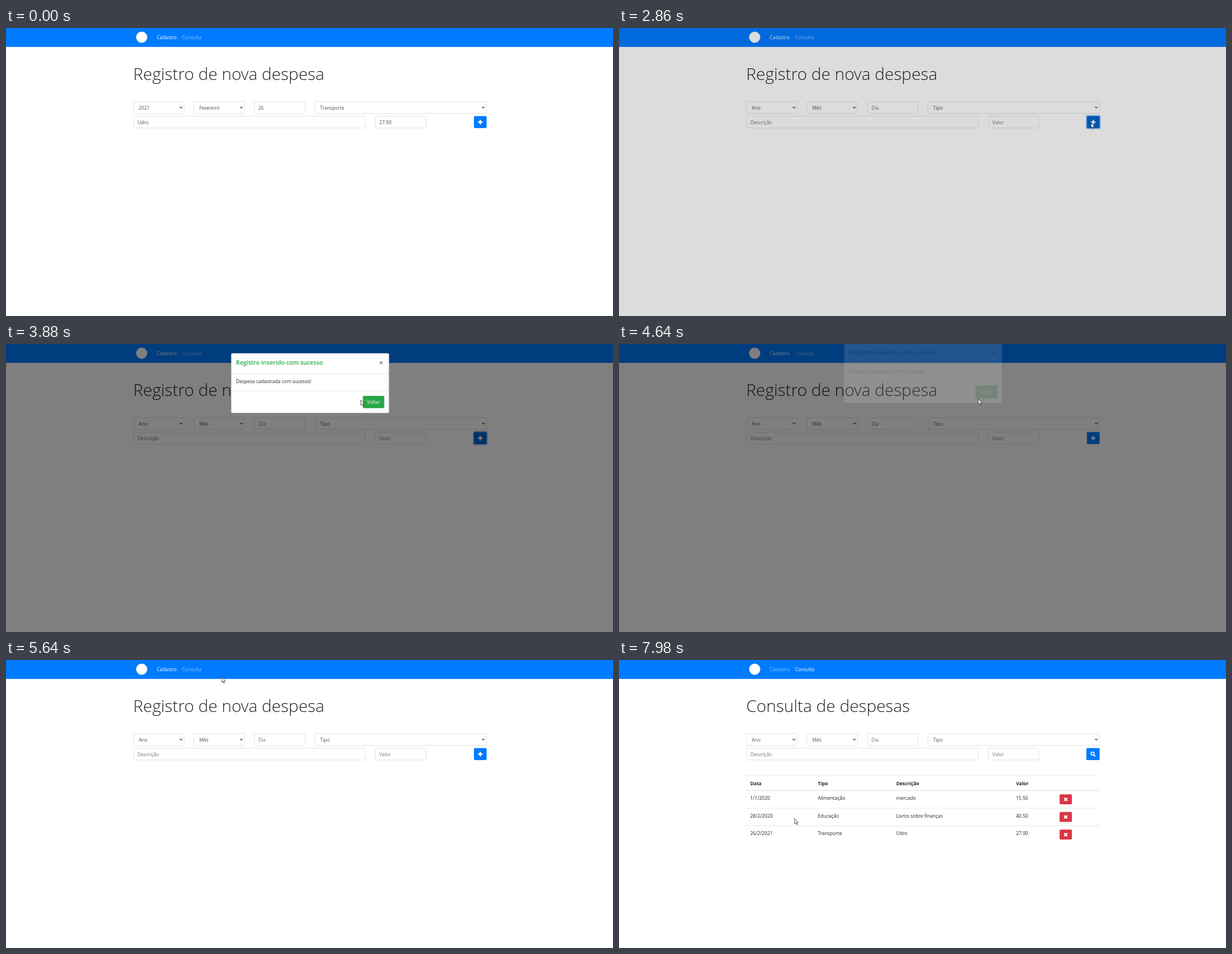
An HTML page with a canvas that plays this animation: 1087 px wide and 515 px high, repeating every 8000 ms.

```html
<!DOCTYPE html>
<html lang="pt-BR">
<head>
<meta charset="utf-8">
<title>Registro de despesas</title>
<style>
  html, body { margin: 0; width: 100%; height: 100%; overflow: hidden; background: #fff; }
  canvas { display: block; }
</style>
</head>
<body>
<canvas id="stage" width="1087" height="515"></canvas>
<script>
const W = 1087, H = 515, LOOP = 8000;
const FAMILY = '"Open Sans", "Noto Sans", sans-serif';
const BLUE = '#007bff', INK = '#212529', FIELD = '#495057', HINT = '#6c757d';
const RIDE = 'Udro';

// Twelve-column form grid
const LEFT = 228, COLUMN = 54.15, GUTTER = 17.1, FIELD_H = 21.7;
const ROW1 = 131.2, ROW2 = 157.4;
const columnX = n => LEFT + n * COLUMN;
const spanW = n => n * COLUMN - GUTTER;
const RIGHT = LEFT + spanW(12);

const stage = document.getElementById('stage').getContext('2d');
const modalLayer = document.createElement('canvas');
modalLayer.width = 300;
modalLayer.height = 130;
const modal = modalLayer.getContext('2d');

const clamp = v => Math.max(0, Math.min(1, v));
const ramp = (t, start, length) => clamp((t - start) / length);
const smooth = p => p * p * (3 - 2 * p);
const easeOut = p => 1 - Math.pow(1 - p, 1.75);
const mix = (a, b, p) => a + (b - a) * p;
const blend = (a, b, p) => `rgb(${a.map((v, i) => Math.round(mix(v, b[i], p)))})`;

function text(c, str, x, y, color, size = 8.5, weight = 400, align = 'left') {
  c.font = `${weight} ${size}px ${FAMILY}`;
  c.textAlign = align;
  c.fillStyle = color;
  c.fillText(str, x, y);
}

function box(c, x, y, w, h, r, fill, line, lineWidth = 0.7) {
  c.beginPath();
  c.roundRect(x, y, w, h, r);
  if (fill) { c.fillStyle = fill; c.fill(); }
  if (line) { c.strokeStyle = line; c.lineWidth = lineWidth; c.stroke(); }
}

function strokes(c, color, width, lines, cap = 'butt') {
  c.strokeStyle = color;
  c.lineWidth = width;
  c.lineCap = cap;
  c.lineJoin = 'miter';
  c.beginPath();
  for (const [x, y, ...rest] of lines) {
    c.moveTo(x, y);
    for (let i = 0; i < rest.length; i += 2) c.lineTo(rest[i], rest[i + 1]);
  }
  c.stroke();
}

function frame(column, span, y) {
  const x = columnX(column), w = spanW(span);
  box(stage, x + 0.35, y + 0.35, w - 0.7, FIELD_H - 0.7, 2, '#fff', '#ced4da');
  return [x, x + w];
}

function field(column, span, y, label, color) {
  const [x] = frame(column, span, y);
  text(stage, label, x + 7.4, y + 14.5, color);
}

function select(column, span, y, label) {
  const [x, end] = frame(column, span, y);
  text(stage, label, x + 9.7, y + 14.9, FIELD);
  const tip = end - 5.9;
  strokes(stage, '#343a40', 1.25, [[tip - 2.4, y + 9.7, tip, y + 12, tip + 2.4, y + 9.7]]);
}

// Pointer path: [start, end, x, y, easing, control x, control y]
const START = [1011, 464];
const PATH = [
  [320, 740, 511, 290, easeOut],
  [1140, 1940, 828, 182, smooth],
  [1950, 2180, 839, 171, smooth],
  [2330, 2780, 845, 169, smooth],
  [3060, 3560, 634, 100, smooth],
  [3840, 4030, 643, 98, smooth],
  [4960, 5740, 374, 27, smooth],
  [5745, 5900, 347, 15, smooth],
  [6020, 6110, 350, 15, smooth],
  [6480, 6660, 350, 21, smooth],
  [7070, 7880, 309, 258, smooth, 270, 150],
  [7890, 7980, 314, 283, smooth]
];

function pointerAt(t) {
  let [x, y] = START;
  for (const [from, to, nx, ny, ease, cx = (x + nx) / 2, cy = (y + ny) / 2] of PATH) {
    if (t < from) break;
    const p = ease(ramp(t, from, to - from)), q = 1 - p;
    x = q * q * x + 2 * p * q * cx + p * p * nx;
    y = q * q * y + 2 * p * q * cy + p * p * ny;
  }
  return [x, y];
}

const within = ([x, y], l, t, r, b) => x >= l && x <= r && y >= t && y <= b;

function pointerKind(pos, t) {
  const covered = t > 2850 && t < 4815;
  if (covered) return t < 4510 && within(pos, 639, 93, 677, 114) ? 'hand' : 'arrow';
  if (within(pos, 311, 4, 355, 30) || within(pos, 838, 157, 861, 179)) return 'hand';
  const overTitle = within(pos, 228, 62, t < 6480 ? 570 : 516, 101);
  return overTitle || within(pos, 228, 157, 644, 179) ? 'beam' : 'arrow';
}

const ARROW = new Path2D('M.4 .4V9.6L2.4 7.8 3.9 11.4 5.4 10.8 3.9 7.3H6.8Z');
const HAND = new Path2D('M-1 7.6V1.1Q-1 .4 0 .4T1 1.1V5Q2.2 4.3 2.8 5.3 4 4.8 4.4 5.9 5.5 5.7 5.5 7V9.8Q5.5 11.4 4.4 12.6V14.4H-1V13L-3.8 9.3Q-4.3 8.2-3.4 7.7-2.4 7.3-1 9Z');

function drawPointer(t) {
  if (t < 320) return;
  const pos = pointerAt(t), kind = pointerKind(pos, t);
  stage.save();
  stage.translate(...pos);
  if (kind === 'beam') {
    strokes(stage, '#333', 0.8, [[0, -5, 0, 5], [-2, -5.3, 2, -5.3], [-2, 5.3, 2, 5.3]]);
  } else {
    const shape = kind === 'hand' ? HAND : ARROW;
    stage.fillStyle = '#fff';
    stage.fill(shape);
    stage.strokeStyle = '#111';
    stage.lineWidth = 0.7;
    stage.lineJoin = 'round';
    stage.stroke(shape);
  }
  stage.restore();
}

function drawNav(t, listing) {
  stage.fillStyle = BLUE;
  stage.fillRect(0, 0, W, 33.8);
  stage.fillStyle = '#fff';
  stage.beginPath();
  stage.arc(243, 16.5, 10, 0, 7);
  stage.fill();
  const faded = 'rgba(255,255,255,.55)';
  const hover = t > 5810 ? 'rgba(255,255,255,.75)' : faded;
  text(stage, 'Cadastro', 270, 20, listing ? faded : '#fff');
  text(stage, 'Consulta', 315, 20, listing ? '#fff' : hover);
}

function drawForm(filled) {
  const tone = filled ? FIELD : HINT;
  select(0, 2, ROW1, filled ? '2021' : 'Ano');
  select(2, 2, ROW1, filled ? 'Fevereiro' : 'Mês');
  field(4, 2, ROW1, filled ? '26' : 'Dia', tone);
  select(6, 6, ROW1, filled ? 'Transporte' : 'Tipo');
  field(0, 8, ROW2, filled ? RIDE : 'Descrição', tone);
  field(8, 2, ROW2, filled ? '27.90' : 'Valor', tone);
}

function drawAddButton(t) {
  const w = 22.8, x = RIGHT - w;
  const focused = t >= 2850 && t < 4510;
  if (focused) box(stage, x - 1.8, ROW2 - 1.8, w + 3.6, FIELD_H + 3.6, 3.5, 'rgba(38,143,255,.5)');
  const hover = t < 2850 ? ramp(t, 2070, 150) : 0;
  const fill = focused ? '#0062cc' : blend([0, 123, 255], [0, 105, 217], hover);
  box(stage, x, ROW2, w, FIELD_H, 2, fill);
  strokes(stage, '#fff', 2.4, [[845.3, 168.3, 853.3, 168.3], [849.3, 164.3, 849.3, 172.3]]);
}

function drawSearchButton() {
  const w = 23.8;
  box(stage, RIGHT - w, ROW2, w, FIELD_H, 2, BLUE);
  stage.strokeStyle = '#fff';
  stage.lineWidth = 1.6;
  stage.beginPath();
  stage.arc(848, 167.4, 2.8, 0, 7);
  stage.stroke();
  strokes(stage, '#fff', 2, [[850.2, 169.6, 852.3, 171.7]], 'round');
}

function drawTable() {
  const columns = [235, 356, 496.5, 711];
  const rows = [
    ['1/1/2020', 'Alimentação', 'mercado', '15.50'],
    ['28/2/2020', 'Educação', 'Livros sobre finanças', '40.50'],
    ['26/2/2021', 'Transporte', RIDE, '27.90']
  ];
  const rule = (y, h) => { stage.fillStyle = '#dee2e6'; stage.fillRect(LEFT, y, RIGHT - LEFT, h); };
  rule(206.5, 0.8);
  rule(232.8, 1.2);
  ['Data', 'Tipo', 'Descrição', 'Valor'].forEach((s, i) => text(stage, s, columns[i], 223.5, INK, 8.5, 700));
  rows.forEach((row, n) => {
    const y = 250.3 + n * 31.5;
    if (n) rule(y - 17.3, 0.8);
    row.forEach((s, i) => text(stage, s, columns[i], y, INK));
    box(stage, 789, y - 10, 22, 17.6, 2, '#dc3545');
    const cy = y - 1;
    strokes(stage, '#fff', 2.4, [[797.4, cy - 2.6, 802.6, cy + 2.6], [802.6, cy - 2.6, 797.4, cy + 2.6]]);
  });
}

function drawModal(t) {
  const opacity = t < 4510 ? ramp(t, 2932, 150) : 1 - ramp(t, 4510, 150);
  if (opacity <= 0) return;
  const shift = t < 4510
    ? -28.5 * (1 - easeOut(ramp(t, 2932, 300)))
    : -28.5 * easeOut(ramp(t, 4510, 300));

  modal.clearRect(0, 0, 300, 130);
  box(modal, 0.5, 0.5, 283, 107, 2.5, '#fff', 'rgba(0,0,0,.2)');
  modal.fillStyle = '#dee2e6';
  modal.fillRect(1, 37, 282, 0.8);
  modal.fillRect(1, 67.5, 282, 0.8);
  text(modal, 'Registro inserido com sucesso', 9.3, 21, '#28a745', 10.75, 600);
  text(modal, '×', 269.5, 21.5, 'rgba(0,0,0,.5)', 13, 700, 'center');
  text(modal, 'Despesa cadastrada com sucesso!', 9.3, 54.3, INK);
  const pressed = t >= 4430;
  if (pressed) box(modal, 234.7, 74.9, 42, 25.6, 3.5, 'rgba(72,180,97,.5)');
  const hover = pressed ? 0 : ramp(t, 3900, 150);
  box(modal, 236.5, 76.7, 38.4, 22, 2, blend([40, 167, 69], [33, 136, 56], hover));
  text(modal, 'Voltar', 255.7, 91, '#fff', 8.5, 400, 'center');

  stage.globalAlpha = opacity;
  stage.drawImage(modalLayer, 402.5, 16 + shift);
  stage.globalAlpha = 1;
}

function draw(t) {
  const listing = t >= 6480;
  stage.fillStyle = '#fff';
  stage.fillRect(0, 0, W, H);
  drawNav(t, listing);
  text(stage, listing ? 'Consulta de despesas' : 'Registro de nova despesa', 227.8, 93, INK, 29.85, 300);
  drawForm(t < 2850);
  if (listing) {
    drawSearchButton();
    drawTable();
  } else {
    drawAddButton(t);
  }
  const shade = 0.5 * (ramp(t, 2835, 95) - ramp(t, 4665, 150));
  stage.fillStyle = `rgba(0,0,0,${shade})`;
  stage.fillRect(0, 0, W, H);
  drawModal(t);
  drawPointer(t);
}

function tick() {
  draw(performance.now() % LOOP);
  requestAnimationFrame(tick);
}
tick();
</script>
</body>
</html>
```
